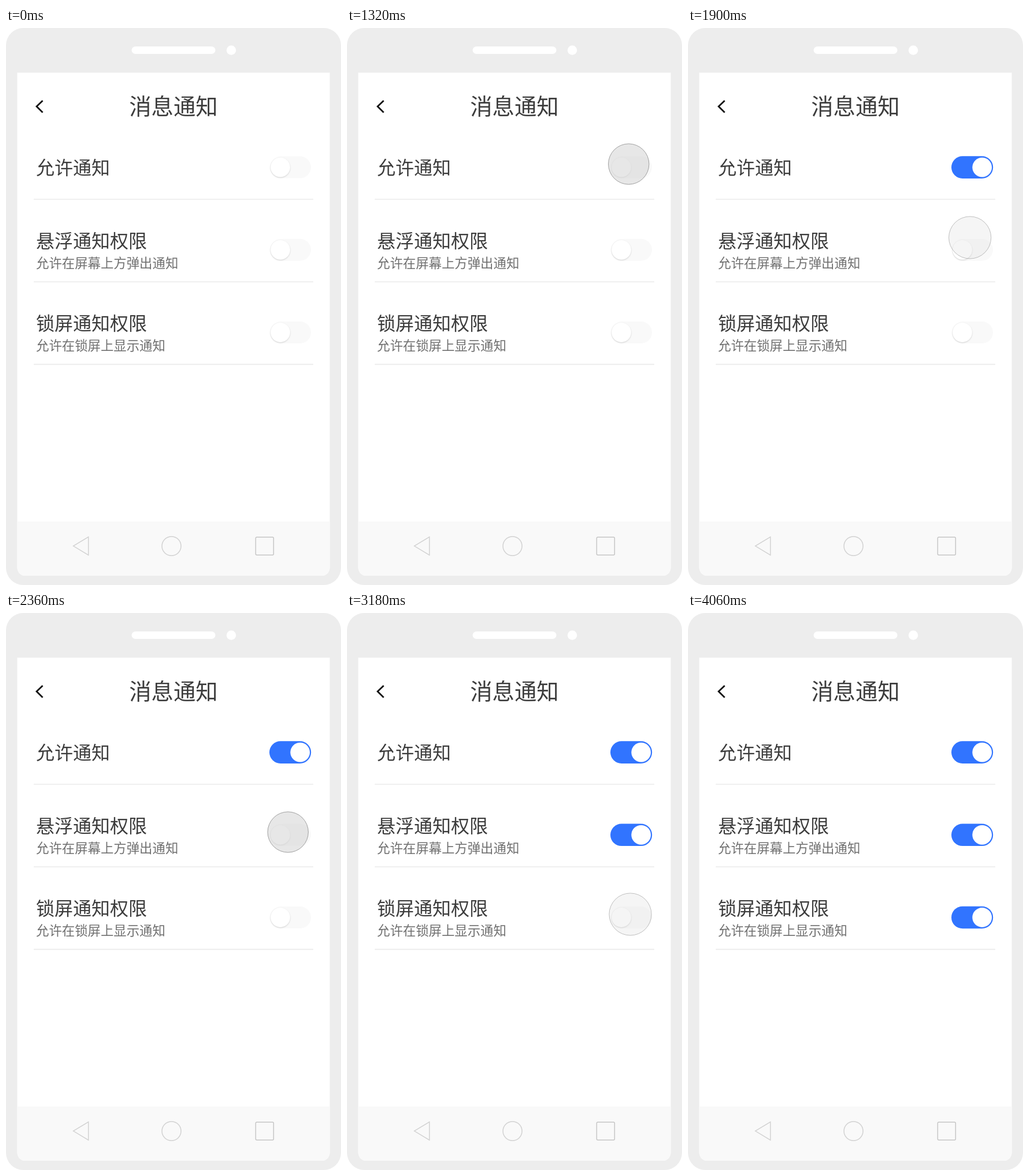
An HTML page for the animation above (4640 ms loop, 580 by 966 pixels).

```html
<!DOCTYPE html>
<html lang="zh-CN">
<head>
<meta charset="utf-8">
<title>消息通知</title>
<style>
  html, body { margin: 0; width: 100%; height: 100%; overflow: hidden; background: #fff; }
  svg { display: block; width: 100%; height: 100%; }
  text { font-family: "Noto Sans CJK SC", "Noto Sans CJK", sans-serif; }
  .title { font-size: 38.4px; fill: #3c3c3c; }
  .label { font-size: 32px; fill: #3c3c3c; }
  .hint { font-size: 22.4px; fill: #707070; }
</style>
</head>
<body>
<svg viewBox="0 0 580 966">
  <rect width="580" height="966" rx="30" fill="#ededed"/>
  <rect x="217.5" y="32" width="145" height="13" rx="6.5" fill="#fff"/>
  <circle cx="390" cy="38.5" r="8.2" fill="#fff"/>
  <path d="M19.5 77.5H560.5V936a14 14 0 0 1-14 14H33.5a14 14 0 0 1-14-14Z" fill="#fff"/>
  <path d="M19.5 856H560.5V936a14 14 0 0 1-14 14H33.5a14 14 0 0 1-14-14Z" fill="#f9f9f9"/>
  <g fill="none" stroke="#d2d2d2" stroke-width="1.5">
    <path d="M116.5 898.3L142.7 882.5V914.2Z"/>
    <circle cx="286.5" cy="898.5" r="16.5"/>
    <rect x="432.3" y="883" width="31" height="31" rx="2" stroke="#c6c6c6"/>
  </g>
  <path d="M63.5 126L53 136L63.5 146.5" fill="none" stroke="#111" stroke-width="2.8"/>
  <text class="title" x="213.2" y="150">消息通知</text>
  <g id="rows"></g>
  <circle id="touch" fill="#d8d8d8" stroke="#979797"/>
</svg>
<script>
const LOOP = 4640;
const RELEASE = 100, SWITCH = 228;
const rows = [
  { y: 241.6, label: '允许通知', labelY: 253.8, press: 1320, on: 1440 },
  { y: 384.8, label: '悬浮通知权限', labelY: 381.2, hint: '允许在屏幕上方弹出通知', press: 2360, on: 2440 },
  { y: 528, label: '锁屏通知权限', labelY: 524.4, hint: '允许在锁屏上显示通知', press: 3360, on: 3460 }
];

const clamp = v => Math.min(1, Math.max(0, v));
const mix = (a, b, p) => a + (b - a) * p;
const smooth = u => u * u * (3 - 2 * u);

// Cubic bezier easing with flat ends: handles (x1, 0) and (x2, 1).
function ease(u, x1, x2) {
  let low = 0, high = 1;
  for (let i = 0; i < 24; i++) {
    const s = (low + high) / 2, r = 1 - s;
    if (3 * s * r * r * x1 + 3 * s * s * r * x2 + s ** 3 < u) low = s;
    else high = s;
  }
  return smooth((low + high) / 2);
}

// Each move runs vertically by its easing; x bends along the way.
const moves = [
  { start: 195, length: 715, from: -38.5, to: 236, x1: .33, x2: .1,
    x: (p, y) => 487.7 + .33 * (236 - y) - .00075 * (236 - y) ** 2 },
  { start: 1534, length: 649, from: 236, to: 380, x1: .33, x2: .1,
    x: p => mix(487.7, 488.2, p) },
  { start: 2500, length: 685, from: 380, to: 522.5, x1: .2, x2: 0,
    x: p => mix(488.2, 490.5, p) + 356 * p ** 10 * (1 - p) },
  { start: 3544, length: 522, from: 522.5, to: -39, x1: 1 / 3, x2: 2 / 3,
    x: (p, y) => 490.5 + .113 * (522.5 - y) - .00018 * (522.5 - y) ** 2 }
];

document.getElementById('rows').innerHTML = rows.map(({ y, label, labelY, hint }) => `
  <text class="label" x="52" y="${labelY}">${label}</text>
  ${hint ? `<text class="hint" x="52" y="${labelY + 35}">${hint}</text>` : ''}
  <path d="M48 ${y + 55.4}H532" stroke="#ebebeb" stroke-width="1.6"/>
  <rect x="457" y="${y - 19}" width="71" height="38" rx="19" fill="#f9f9f9"/>
  <rect class="track" x="456" y="${y - 19.3}" width="72.2" height="38.6" rx="19.3" fill="#3174ff"/>
  <circle class="knob" cy="${y}" r="16.9" fill="#fff"/>`).join('');

const tracks = document.querySelectorAll('.track');
const knobs = document.querySelectorAll('.knob');
const touch = document.getElementById('touch');

function set(node, attributes) {
  for (const name in attributes) node.setAttribute(name, attributes[name]);
}

function draw(t) {
  let pressed = 0;
  rows.forEach((row, i) => {
    const p = smooth(clamp((t - row.on) / SWITCH));
    set(tracks[i], { opacity: p });
    set(knobs[i], { cx: mix(475, 509.2, p) });
    knobs[i].style.filter = `drop-shadow(0 1px 1.2px rgba(0,0,0,${.16 * (1 - p)}))`;
    if (t >= row.press) pressed = 1 - clamp((t - row.on) / RELEASE);
  });

  const move = moves.filter(m => t >= m.start).pop() || moves[0];
  const p = ease(clamp((t - move.start) / move.length), move.x1, move.x2);
  const y = mix(move.from, move.to, p);
  set(touch, {
    cx: move.x(p, y), cy: y, r: mix(36.6, 35.2, pressed),
    'fill-opacity': mix(.26, .6, pressed),
    'stroke-opacity': mix(.6, .9, pressed)
  });
}

const begin = performance.now();
function frame() {
  draw((performance.now() - begin) % LOOP);
  requestAnimationFrame(frame);
}
frame();
</script>
</body>
</html>
```
